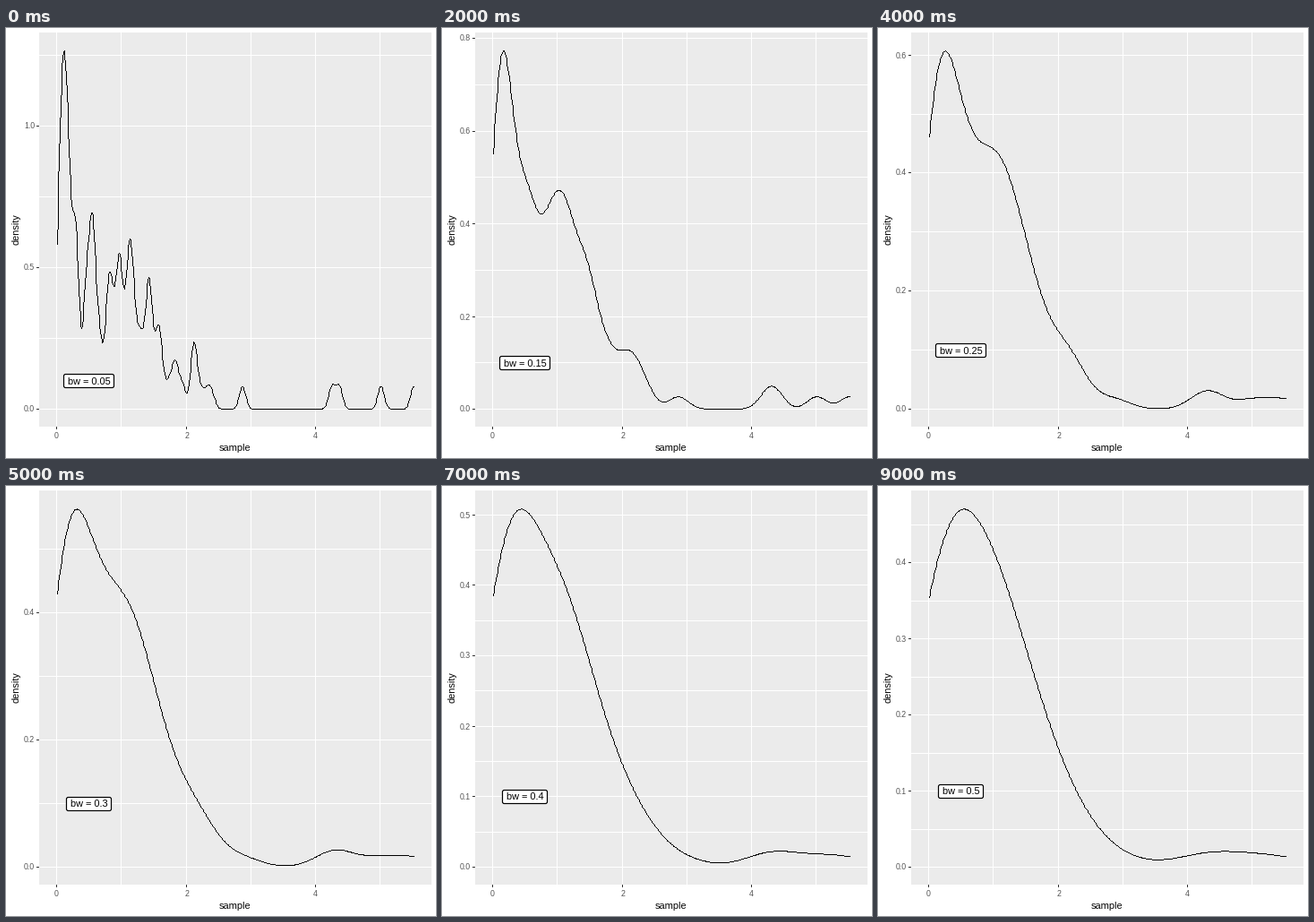
Write a matplotlib script that moves like this. It is 480 by 480 pixels and loops after 10 s.

```python
import numpy as np
import matplotlib.pyplot as plt
from matplotlib.animation import FuncAnimation
from matplotlib.patches import FancyBboxPatch, Rectangle

SIZE, DPI = 480, 80
PX = 72 / DPI
FRAMES = 10
TOP, BOTTOM, RIGHT = 5.48, 444.98, 474.52
MARGIN = 1 / 22  # share of the panel left free on each side of the data
X_MIN, X_MAX = 0.012, 5.515
NARROW = 0.05

# Key points (x, density) of the narrowest curve: its turns and its flanks.
TURNS = [(0.115, 1.266), (0.388, 0.285), (0.547, 0.695), (0.713, 0.235),
         (0.824, 0.482), (0.889, 0.435), (0.969, 0.553), (1.045, 0.424),
         (1.135, 0.603), (1.315, 0.285), (1.426, 0.467), (1.522, 0.277),
         (1.571, 0.298), (1.7, 0.106), (1.827, 0.175), (2.01, 0.055),
         (2.124, 0.238), (2.35, 0.087)]
FLANKS = [(X_MIN, 0.581), (0.235, 0.73), (0.27, 0.69), (0.31, 0.625),
          (1.25, 0.31), (1.63, 0.205), (1.92, 0.11), (2.22, 0.097),
          (2.42, 0.055)]
# Lone observations on the right, one hundredth of the sample each.
TAIL = np.array([2.872, 4.253, 4.366, 5.01, X_MAX])


def kernel(x, centers, bw):
    z = (np.asarray(x)[:, None] - centers) / bw
    return np.exp(-z * z / 2) / (bw * np.sqrt(2 * np.pi))


def fit_weights(centers):
    """Non-negative weights whose narrow density meets the key points."""
    turns, flanks = np.array(TURNS), np.array(FLANKS)
    at_turns = kernel(turns[:, 0], centers, NARROW)
    flat = (centers - turns[:, :1]) / NARROW * at_turns
    at_flanks = kernel(flanks[:, 0], centers, NARROW)
    a = np.vstack([at_turns, flat, at_flanks, np.ones(len(centers))])
    b = np.concatenate([turns[:, 1], np.zeros(len(turns)), flanks[:, 1],
                        [1 - 0.01 * len(TAIL)]])

    gram, proj = a.T @ a, a.T @ b
    step = 1 / np.linalg.norm(gram, 2)
    w = v = np.full(len(centers), 1 / len(centers))
    t = 1.0
    for _ in range(20000):
        new = np.maximum(v - step * (gram @ v - proj), 0)
        t_new = (1 + np.sqrt(1 + 4 * t * t)) / 2
        v = new + (t - 1) / t_new * (new - w)
        w, t = new, t_new
    return w


body = np.arange(X_MIN, 2.5, 0.025)
centers = np.concatenate([body, TAIL])
weights = np.concatenate([fit_weights(body), np.full(len(TAIL), 0.01)])
grid = np.linspace(X_MIN, X_MAX, 512)

plt.rcParams.update({"font.family": "Liberation Sans",
                     "text.hinting": "native"})
fig = plt.figure(figsize=(SIZE / DPI, SIZE / DPI), dpi=DPI, facecolor="white")
ax = fig.add_axes([0, 0, 1, 1])


def cell(v):
    return np.floor(np.asarray(v) + 0.5).astype(int)


def bar(x, y, w, h, color):
    """Crisp rectangle on whole pixels."""
    ax.add_patch(Rectangle((x, y), w, h, fc=color, lw=0, antialiased=False))


def text(x, y, s, size, color="black", **kw):
    kw = {"ha": "center", "va": "center", **kw}
    ax.text(x, y, s, fontsize=size * PX, color=color, zorder=6, **kw)


def trace(x, y):
    """One-pixel polyline without smoothing."""
    x, y = cell(x), cell(y)
    image = np.zeros((SIZE, SIZE, 4))
    for x0, y0, x1, y1 in zip(x, y, x[1:], y[1:]):
        n = max(abs(x1 - x0), abs(y1 - y0)) + 1
        image[cell(np.linspace(y0, y1, n)), cell(np.linspace(x0, x1, n)), 3] = 1
    ax.imshow(image, extent=(0, SIZE, SIZE, 0), interpolation="nearest",
              aspect="auto", zorder=4)


def major_step(peak):
    if peak > 1:
        return 0.5
    if peak > 0.8:
        return 0.25
    return 0.2 if peak > 0.54 else 0.1


def draw(i):
    ax.clear()
    ax.axis("off")

    bw = NARROW * (i + 1)
    density = kernel(grid, centers, bw) @ weights
    peak = density.max()
    step = major_step(peak)
    digits = 2 if step == 0.25 else 1
    left = 27 + 5 * (digits + 1)
    width, height = RIGHT - left, BOTTOM - TOP

    def sx(x):
        share = (x - X_MIN) / (X_MAX - X_MIN)
        return left + width * (MARGIN + (1 - 2 * MARGIN) * share)

    def sy(y):
        return BOTTOM - height * (MARGIN + (1 - 2 * MARGIN) * y / peak)

    x0, x1, y0, y1 = cell([left, RIGHT, TOP, BOTTOM])
    bar(x0, y0, x1 - x0, y1 - y0, "#EBEBEB")

    for k in range(6):
        x = cell(sx(k))
        bar(x, y0, 1, y1 - y0, "white")
        if k % 2 == 0:
            bar(x, y1, 1, 3, "#333333")
            text(x + 0.5, 456, str(k), 8.8, "#4D4D4D")

    k = 0
    while sy(k * step / 2) > TOP:
        y = cell(sy(k * step / 2))
        bar(x0, y, x1 - x0, 1, "white")
        if k % 2 == 0:
            bar(x0 - 3, y, 3, 1, "#333333")
            text(x0 - 5, y + 1, f"{k * step / 2:.{digits}f}", 8.8, "#4D4D4D",
                 ha="right")
        k += 1

    trace(sx(grid), sy(density))

    name = f"bw = {bw:g}"
    w = 6 * len(name) + 2
    cx, cy = cell(sx(0.5)) + 0.5, cell(sy(0.1)) + 1
    ax.add_patch(FancyBboxPatch(
        (cx - w / 2, cy - 7.5), w, 15,
        boxstyle="round,pad=0,rounding_size=2", fc="white", ec="black",
        lw=1.2 * PX, zorder=5))
    text(cx, cy + 0.5, name, 11)

    text((left + RIGHT) / 2, 469.5, "sample", 11)
    text(11.5, (TOP + BOTTOM) / 2 - 0.5, "density", 11, rotation=90)
    ax.set(xlim=(0, SIZE), ylim=(SIZE, 0))
    return []


anim = FuncAnimation(fig, draw, frames=FRAMES, interval=1000,
                     init_func=lambda: [], repeat=True, repeat_delay=0)
plt.show()
```
